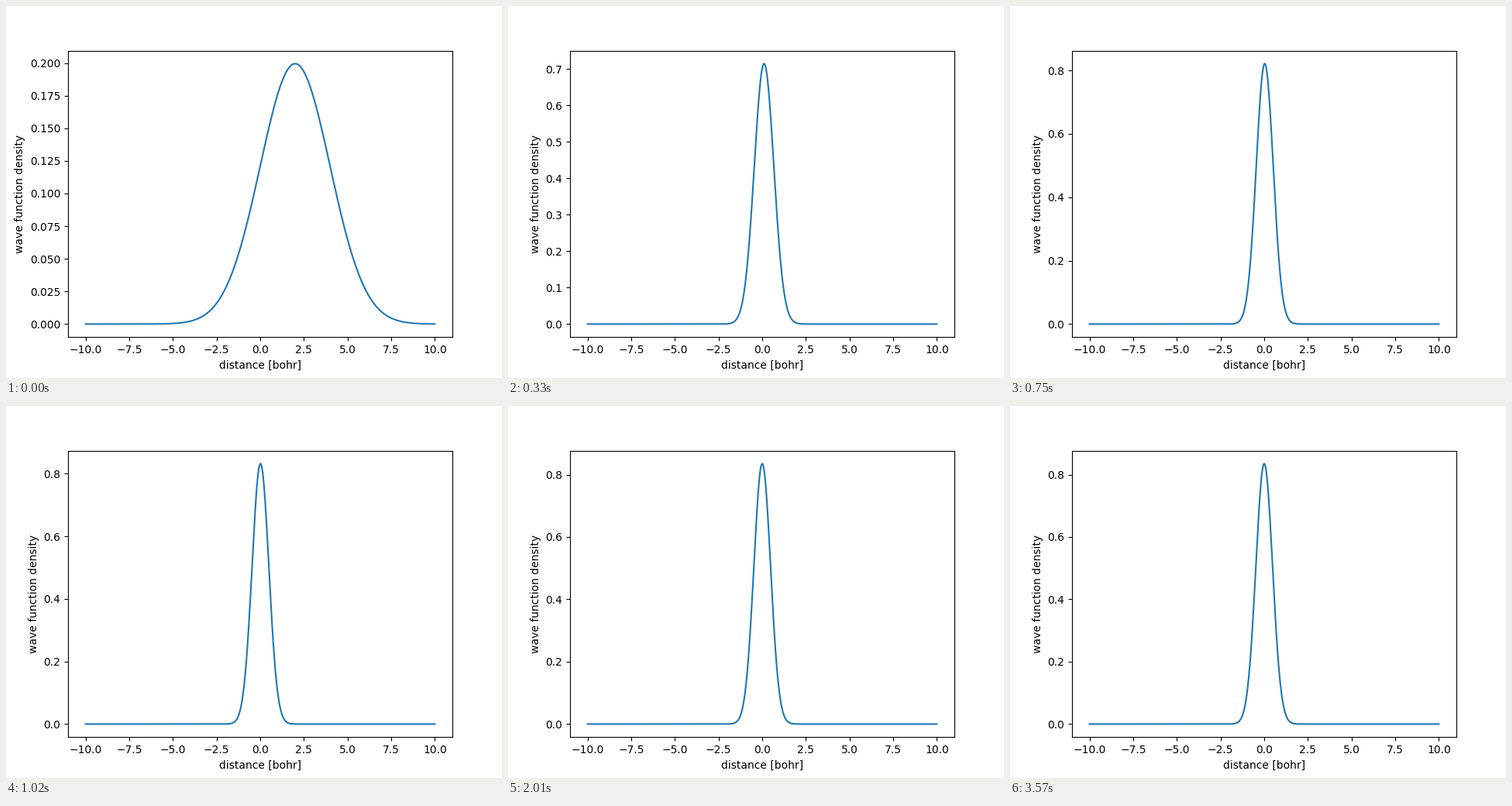
Recreate the animation shown at these times as a matplotlib script. Size 640x480 px, loop 3600 ms.

```python
import numpy as np
import matplotlib.pyplot as plt
from matplotlib.animation import FuncAnimation

FRAMES, INTERVAL = 120, 30

# Gaussian packet relaxing in a harmonic well under imaginary-time propagation
OMEGA = np.sqrt(4.8)     # ground-state exponent (m = hbar = 1)
PHASE_STEP = 0.0795      # omega * dt per frame
CENTER, SIGMA = 2.0, 2.0
A0 = 1 / (2 * SIGMA**2)  # initial exponent of the wave function
THETA = np.arctanh(A0 / OMEGA)

x = np.linspace(-10, 10, 1001)


def density(step):
    phase = THETA + PHASE_STEP * step
    a = OMEGA * np.tanh(phase)
    mean = A0 * CENTER * np.cosh(THETA) / np.cosh(phase) / a
    return np.sqrt(a / np.pi) * np.exp(-a * (x - mean) ** 2)


fig, ax = plt.subplots(figsize=(6.4, 4.8), dpi=100)
line, = ax.plot(x, density(0))
ax.set_xlabel("distance [bohr]")
ax.set_ylabel("wave function density")


def update(step):
    line.set_ydata(density(step))
    ax.relim()
    ax.autoscale_view()
    return line,


anim = FuncAnimation(fig, update, frames=FRAMES, interval=INTERVAL,
                     repeat=True, repeat_delay=0, blit=False)
plt.show()
```
